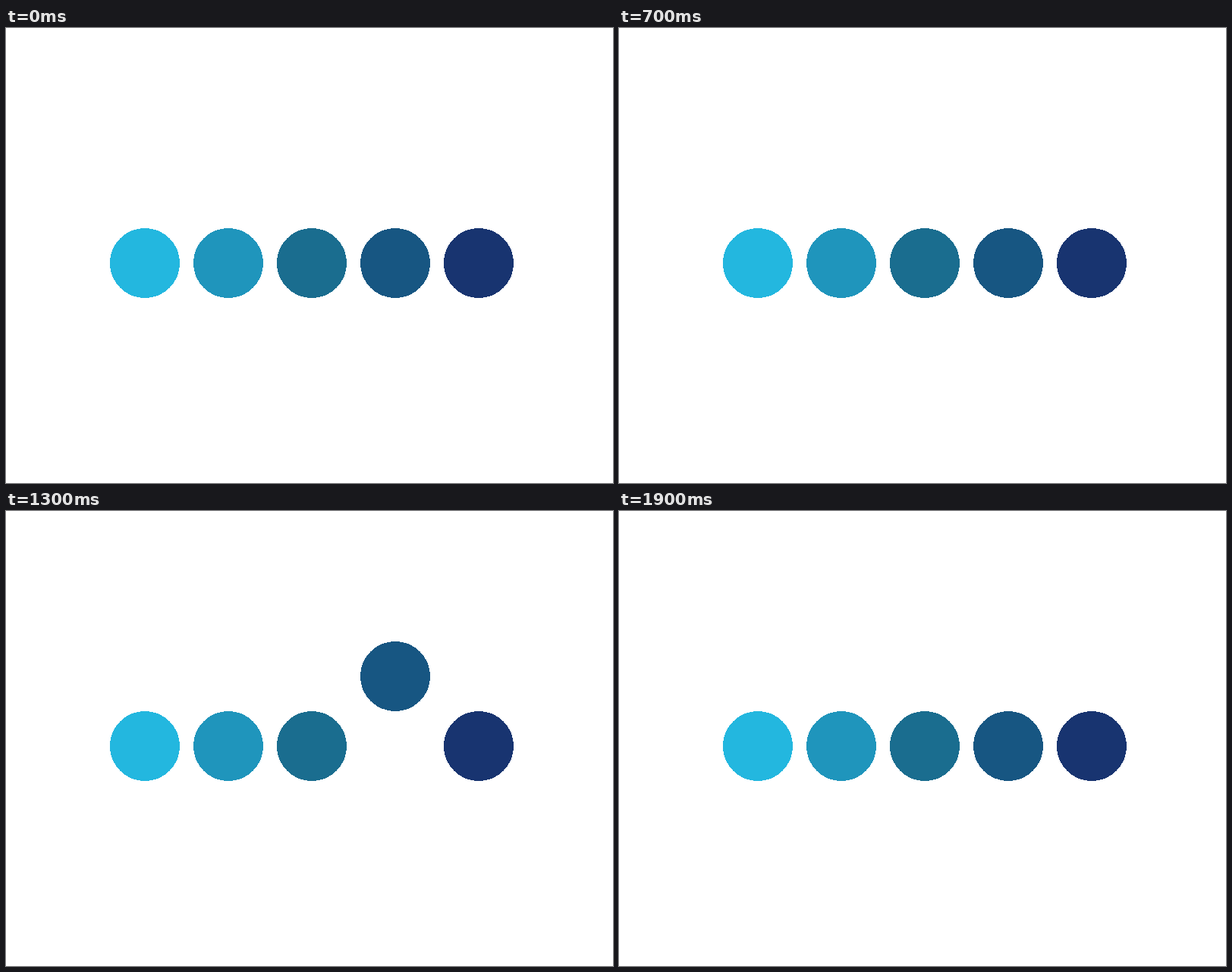
An HTML page for the animation above (2000 ms loop, 800 by 600 pixels).

```html
<!DOCTYPE html>
<html lang="en">
<head>
<meta charset="utf-8">
<title>Bouncing dots</title>
<style>
  html, body { margin: 0; width: 100%; height: 100%; overflow: hidden; background: #fff; }
  svg { display: block; width: 800px; height: 600px; }
</style>
</head>
<body>
<svg viewBox="0 0 800 600" shape-rendering="crispEdges"></svg>
<script>
const LOOP = 2000, STEP = 100, STAGGER = 400;
const RADIUS = 46, FIRST_X = 183, GAP = 110, REST_Y = 310;
const COLORS = ['#23b7df', '#1f95bc', '#1a6d8f', '#175682', '#183470'];
const HOP = [0, 92, 46, 0];   // height above rest, one entry per step

const svg = document.querySelector('svg');
const dots = COLORS.map((fill, i) => {
  const dot = document.createElementNS(svg.namespaceURI, 'circle');
  const attrs = { cx: FIRST_X + i * GAP, cy: REST_Y, r: RADIUS, fill };
  for (const name in attrs) dot.setAttribute(name, attrs[name]);
  return svg.appendChild(dot);
});

function draw(time) {
  const t = time % LOOP;
  dots.forEach((dot, i) => {
    const step = Math.floor((t - i * STAGGER) / STEP);
    dot.setAttribute('cy', REST_Y - (HOP[step] || 0));
  });
}

const start = performance.now();
function tick() {
  draw(performance.now() - start);
  requestAnimationFrame(tick);
}
tick();
</script>
</body>
</html>
```
